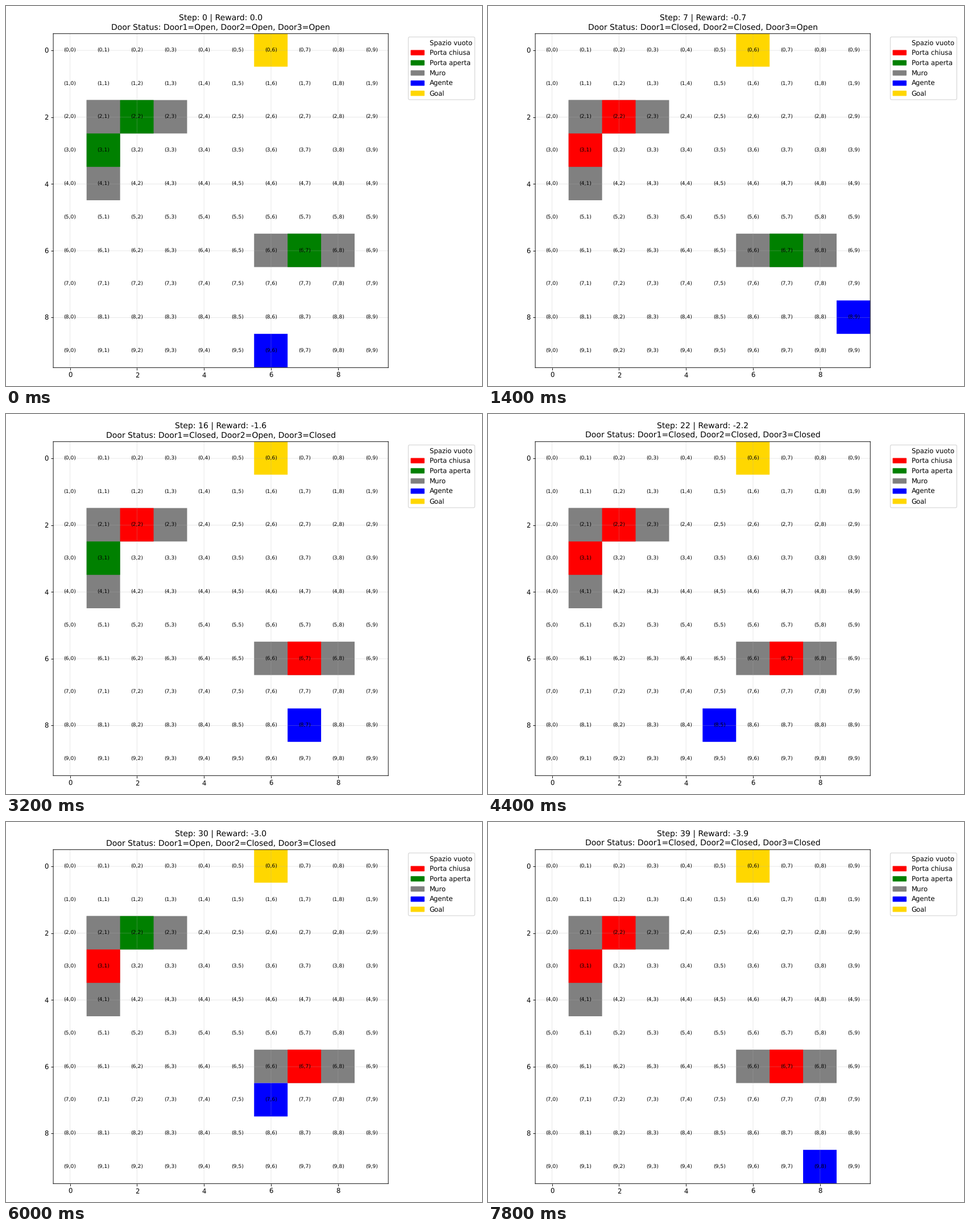
Animation of 837x669 px, one loop 8000 ms. Source, as a matplotlib script:

```python
import matplotlib.pyplot as plt
from matplotlib.animation import FuncAnimation
from matplotlib.patches import Patch, Rectangle

# Unsnapped, unhinted drawing keeps the soft sub-pixel edges.
plt.rcParams["path.snap"] = False
plt.rcParams["text.hinting"] = "none"

W, H, DPI = 837, 669, 83.65
LEFT, RIGHT, TOP, BOTTOM = 83.1, 672.2, 48.7, 636.7
SIZE, STEPS = 10, 40
# Cells sit slightly up and left of the axes frame (in cell units).
EDGE_X, EDGE_Y = 0.505, 0.512

# Walls as (row, col, rows, cols); the doors are drawn on top.
WALLS = [(2, 1, 1, 3), (2, 1, 3, 1), (6, 6, 1, 3)]
GOAL, START = (0, 6), (9, 6)
# Each door: its cell and the steps at which it flips (all start open).
DOORS = [((2, 2), (5, 26, 37)),
         ((3, 1), (4, 10, 18, 23, 27, 36, 38)),
         ((6, 7), (14,))]
# One letter per step; "-" means the agent bumps and stays.
MOVES = "UU-RRDRUL-LRDDLULD-L-UUR-R-DLURR-D-DR-L"
DELTA = {"U": (-1, 0), "D": (1, 0), "L": (0, -1), "R": (0, 1), "-": (0, 0)}


def agent_path():
    path = [START]
    for move in MOVES:
        (r, c), (dr, dc) = path[-1], DELTA[move]
        path.append((r + dr, c + dc))
    return path


def is_open(flips, step):
    return sum(step >= t for t in flips) % 2 == 0


def corner(row, col):
    return col - EDGE_X, row - EDGE_Y


def add_block(row, col, color, rows=1, cols=1):
    rect = Rectangle(corner(row, col), cols, rows, facecolor=color,
                     linewidth=0, zorder=0.5)
    return ax.add_patch(rect)


fig = plt.figure(figsize=((W + 1e-4) / DPI, (H + 1e-4) / DPI), dpi=DPI,
                 facecolor="white")
ax = fig.add_axes([LEFT / W, 1 - BOTTOM / H,
                   (RIGHT - LEFT) / W, (BOTTOM - TOP) / H])
ax.set_xlim(-0.5, SIZE - 0.5)
ax.set_ylim(SIZE - 0.5, -0.5)
ax.set_xticks(range(0, SIZE, 2))
ax.set_yticks(range(0, SIZE, 2))
ax.grid(True, alpha=0.3)

for row, col, rows, cols in WALLS:
    add_block(row, col, "gray", rows, cols)
add_block(*GOAL, "gold")
door_cells = [add_block(*cell, "green") for cell, _ in DOORS]
agent = add_block(*START, "blue")

for row in range(SIZE):
    for col in range(SIZE):
        ax.text(col, row, f"({row},{col})", ha="center", va="center",
                fontsize=8, color="black")

LEGEND = [("white", "Spazio vuoto"), ("red", "Porta chiusa"),
          ("green", "Porta aperta"), ("gray", "Muro"),
          ("blue", "Agente"), ("gold", "Goal")]
ax.legend(handles=[Patch(color=c, label=name) for c, name in LEGEND],
          bbox_to_anchor=(1.05, 1), loc="upper left", labelspacing=0.54)

title = ax.set_title("", linespacing=1.24)
path = agent_path()


def draw(step):
    status = []
    for i, (rect, (_, flips)) in enumerate(zip(door_cells, DOORS), 1):
        opened = is_open(flips, step)
        rect.set_facecolor("green" if opened else "red")
        status.append(f"Door{i}={'Open' if opened else 'Closed'}")
    agent.set_xy(corner(*path[step]))
    title.set_text(f"Step: {step} | Reward: {0 - 0.1 * step:.1f}\n"
                   f"Door Status: {', '.join(status)}")
    return [agent, title, *door_cells]


anim = FuncAnimation(fig, draw, frames=STEPS, interval=200, repeat=True,
                     repeat_delay=0, blit=False)
plt.show()
```
